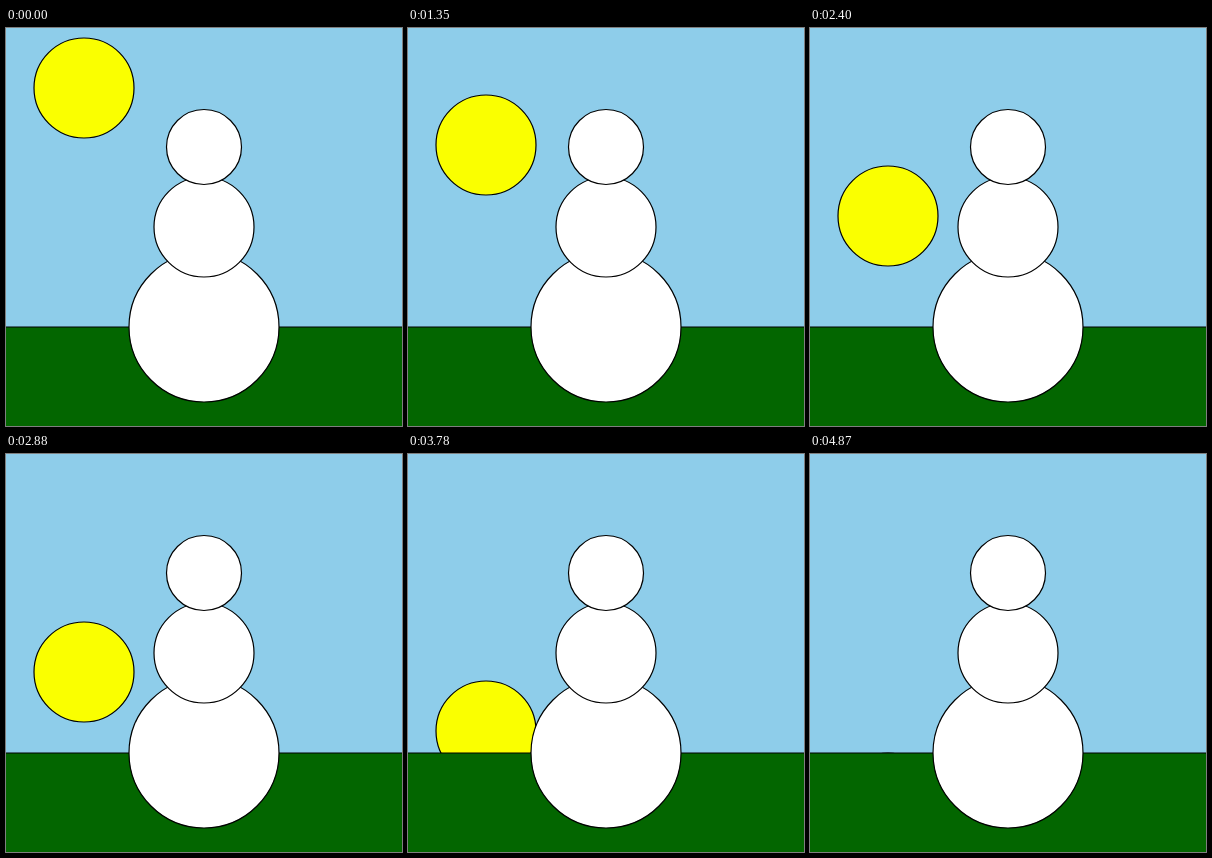
Recreate the animation shown at these times as an HTML page. Size 396x398 px, loop 5.7 s.

```html
<!DOCTYPE html>
<html lang="en">
<head>
<meta charset="utf-8">
<title>Snowman at sunset</title>
<style>
  html, body { margin: 0; width: 100%; height: 100%; overflow: hidden; background: #8ecdea; }
  svg { display: block; stroke: #000; stroke-width: 1; }
  circle { stroke-width: 1.2; }
</style>
</head>
<body>
<svg width="396" height="398" viewBox="0 0 396 398">
  <circle id="sun" cx="78" cy="60" r="50" fill="#faff00"/>
  <rect x="-2" y="299" width="400" height="102" fill="#036600"/>
  <g fill="#fff">
    <circle cx="198" cy="299" r="75"/>
    <circle cx="198" cy="199" r="50"/>
    <circle cx="198" cy="119" r="37.5"/>
  </g>
</svg>
<script>
const LOOP = 5700;
const TICK = 30;

// Key points of the sun's centre: [ms, y]; it rests, then sinks almost steadily
const keys = [
  [530, 60], [800, 79], [950, 79], [960, 90], [1800, 148],
  [2400, 188], [3360, 248], [3780, 277], [4870, 350]
];

function heightAt(t) {
  const next = keys.findIndex(([time]) => time > t);
  if (next === 0) return keys[0][1];
  if (next < 0) return keys[keys.length - 1][1];
  const [t0, y0] = keys[next - 1], [t1, y1] = keys[next];
  return Math.round(y0 + (y1 - y0) * (t - t0) / (t1 - t0));
}

const sun = document.getElementById('sun');
const begin = performance.now();

function draw(now) {
  const t = Math.max(0, now - begin) % LOOP;
  sun.setAttribute('cy', heightAt(Math.floor(t / TICK) * TICK));
  requestAnimationFrame(draw);
}
draw(begin);
</script>
</body>
</html>
```
